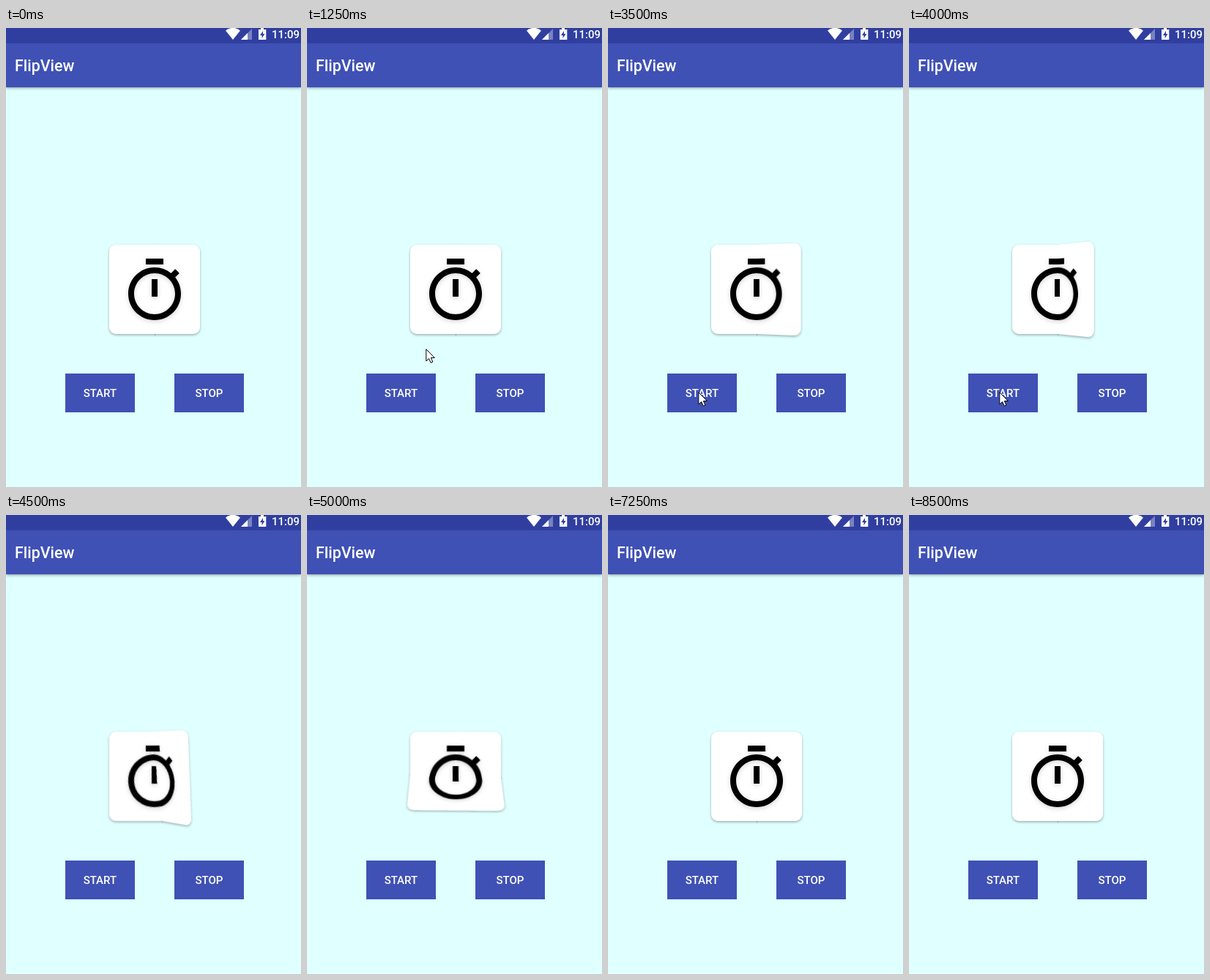
Animation, 403 px wide and 627 px high, one loop 9 s. Source, as an HTML page:

```html
<!DOCTYPE html>
<html lang="en">
<head>
<meta charset="utf-8">
<title>FlipView</title>
<style>
  html, body { margin: 0; width: 100%; height: 100%; overflow: hidden; }
  body { background: #e0ffff; font: 500 15px Roboto, sans-serif; color: #fff; }

  .stage { position: relative; width: 403px; height: 627px; overflow: hidden; background: #e0ffff; }
  .stage > * { position: absolute; }

  .toolbar { top: 0; left: 0; width: 403px; height: 81px; background: #3f51b5; box-shadow: 0 1px 4px rgba(0, 0, 0, .4); }
  .status { top: 0; left: 0; width: 403px; height: 21px; background: #303f9f; }
  .icons { top: 0; left: 300px; }
  .clock { left: 363px; top: 0; line-height: 18px; }
  .title { left: 12px; top: 37px; font-size: 21.4px; line-height: 30px; white-space: nowrap; }

  .button { top: 471.5px; width: 95px; height: 53.5px; line-height: 55px; text-align: center; background: #3f51b5; }
  .start { left: 81px; }
  .stop { left: 230px; }

  /* --z turns the fold line, --y lifts one half, --fix lifts the other */
  .flip {
    --z: 0deg; --y: 0deg; --fix: 0deg;
    left: 203px; top: 357px; width: 0; height: 0;
    animation: fold 9s step-end infinite;
  }
  .half { position: absolute; left: -150px; top: -150px; width: 300px; height: 300px; transform: rotate(var(--z)); }
  .near { clip-path: inset(0 calc(50% - .3px) 0 0); --tilt: var(--fix); }
  .far { clip-path: inset(0 0 0 50%); --tilt: calc(-1 * var(--y)); }
  .tilt {
    width: 100%; height: 100%;
    transform: perspective(560px) rotateY(var(--tilt)) rotate(calc(-1 * var(--z)));
  }
  .card {
    position: absolute; left: 88px; top: 89px; width: 124px; height: 122px;
    border-radius: 9px; background: #fff; box-shadow: 0 1.5px 3.5px rgba(0, 0, 0, .32);
  }
  .card svg { position: absolute; left: 14px; top: 15px; filter: blur(.4px) drop-shadow(0 2px 3px rgba(0, 0, 0, .16)); }

  @keyframes fold {
    0%     { --y: 0deg;  --z: 0deg;    --fix: 0deg; }
    30.55% { --y: 6deg;  --z: 0deg;    --fix: 0deg; }
    38.88% { --y: 20deg; --z: 0deg;    --fix: 0deg; }
    41.66% { --y: 34deg; --z: 0deg;    --fix: 0deg; }
    44.44% { --y: 42deg; --z: 0deg;    --fix: 0deg; }
    47.22% { --y: 45deg; --z: 0deg;    --fix: 0deg; }
    50%    { --y: 45deg; --z: -9.5deg; --fix: 0deg; }
    52.77% { --y: 45deg; --z: -148deg; --fix: 0deg; }
    55.55% { --y: 45deg; --z: -268deg; --fix: 0deg; }
    58.33% { --y: 45deg; --z: -270deg; --fix: 0deg; }
    66.66% { --y: 45deg; --z: -270deg; --fix: 3deg; }
    69.44% { --y: 45deg; --z: -270deg; --fix: 9deg; }
    72.22% { --y: 45deg; --z: -270deg; --fix: 17deg; }
    75%    { --y: 45deg; --z: -270deg; --fix: 25deg; }
    77.77% { --y: 45deg; --z: -270deg; --fix: 29deg; }
    80.55%, 100% { --y: 0deg; --z: 0deg; --fix: 0deg; }
  }

  .cursor { left: 0; top: 0; animation: point 9s step-end infinite; }
  @keyframes point {
    0%     { transform: translate(-40px, -40px); }
    13.88% { transform: translate(162px, 438px); }
    16.66% { transform: translate(149px, 459px); }
    19.44% { transform: translate(136px, 478px); }
    22.22% { transform: translate(123px, 497px); }
    47.22% { transform: translate(-40px, -40px); }
    88.88% { transform: translate(311px, 561px); }
    91.66% { transform: translate(300px, 620px); }
    94.44%, 100% { transform: translate(-40px, -40px); }
  }
</style>
</head>
<body>
<svg width="0" height="0" style="position:absolute">
  <symbol id="timer" viewBox="0 0 24 24">
    <path d="M15 1H9v2h6V1zm-4 13h2V8h-2v6zm8.03-6.61l1.42-1.42c-.43-.51-.9-.99-1.41-1.41l-1.42 1.42C16.07 4.74 14.12 4 12 4c-4.97 0-9 4.03-9 9s4.02 9 9 9 9-4.03 9-9c0-2.12-.74-4.07-1.97-5.61zM12 20c-3.87 0-7-3.13-7-7s3.13-7 7-7 7 3.13 7 7-3.13 7-7 7z"/>
  </symbol>
</svg>
<div class="stage">
  <div class="toolbar"></div>
  <div class="status"></div>
  <svg class="icons" width="60" height="18" fill="#fff">
    <path d="M10 16L0 3.5Q10-4 20 3.5z"/>
    <path d="M21 16L36 1V16z" opacity=".35"/>
    <path d="M21 16L30 7V16z"/>
    <path d="M45 2h3V0h4v2h3.300v14H45z"/>
    <path d="M51 4l-4 6h2.500v4l4-6H51z" fill="#303f9f"/>
  </svg>
  <div class="clock">11:09</div>
  <div class="title">FlipView</div>

  <div class="flip">
    <div class="half near"><div class="tilt"><div class="card"><svg width="96" height="96"><use href="#timer"/></svg></div></div></div>
    <div class="half far"><div class="tilt"><div class="card"><svg width="96" height="96"><use href="#timer"/></svg></div></div></div>
  </div>

  <div class="button start">START</div>
  <div class="button stop">STOP</div>

  <svg class="cursor" width="14" height="21">
    <path d="M.8 .8V17l3.800-3.500 2.500 5.800 2.700-1.200-2.500-5.600h5z" fill="#fff" stroke="#000"/>
  </svg>
</div>
</body>
</html>
```
